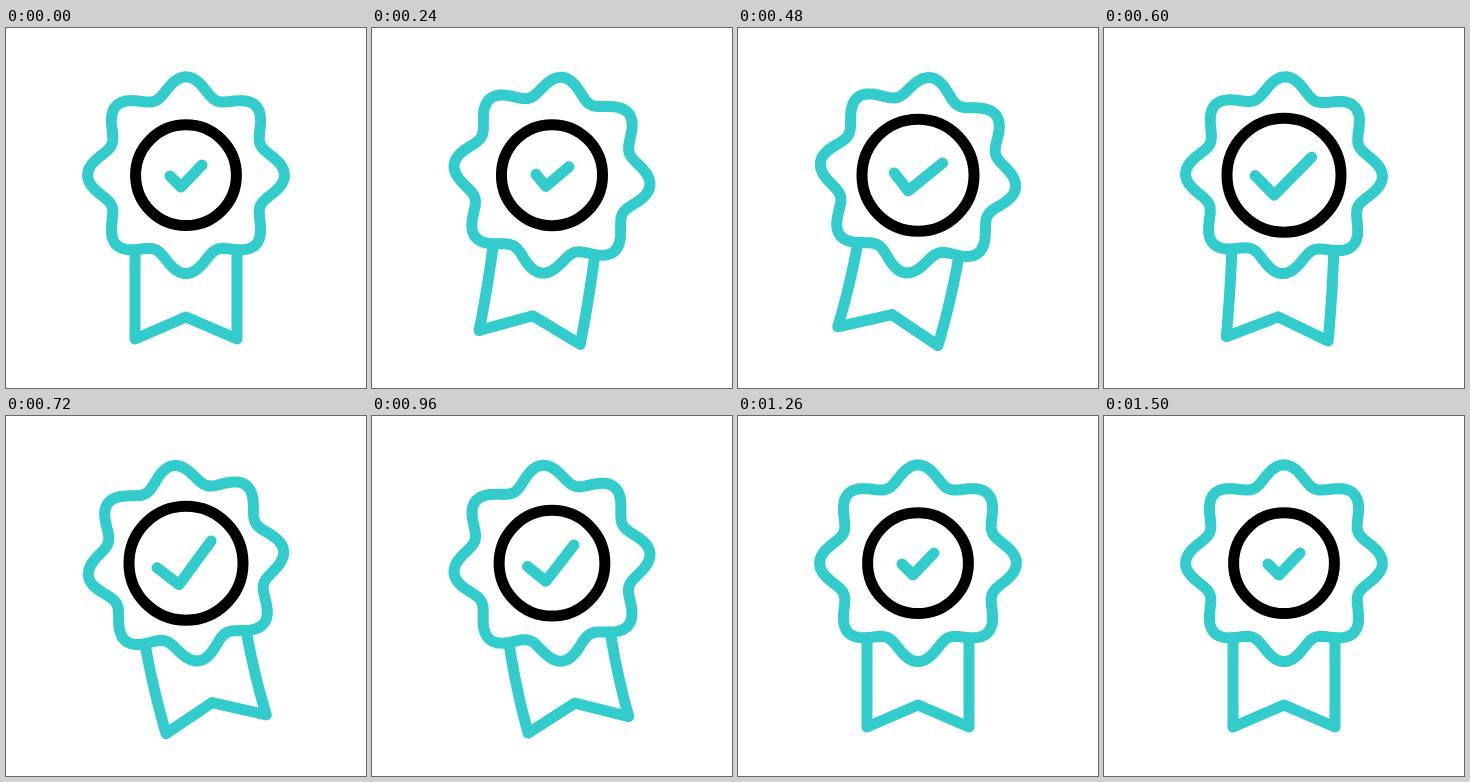
Recreate the animation shown at these times as an HTML page with a canvas. Size 360x360 px, loop 1.53 s.

```html
<!DOCTYPE html>
<html lang="en">
<head>
<meta charset="utf-8">
<title>Award badge</title>
<style>
  html, body { margin: 0; height: 100%; overflow: hidden; background: #fff; }
  canvas { display: block; width: 100vw; height: 100vh; }
</style>
</head>
<body>
<canvas id="stage" width="360" height="360"></canvas>
<script>
const ctx = document.getElementById('stage').getContext('2d');
const LOOP = 1530, CX = 180, CY = 147.2;
const TEAL = '#33cccc';

// Smooth 0..1 progress between two moments
function ease(t, start, end) {
  const u = Math.min(1, Math.max(0, (t - start) / (end - start)));
  return u * u * (3 - 2 * u);
}

const rad = deg => deg * Math.PI / 180;
const mix = (a, b, k) => a + (b - a) * k;

function rotate([x, y], angle) {
  const dx = x - CX, dy = y - CY, c = Math.cos(angle), s = Math.sin(angle);
  return [CX + dx * c - dy * s, CY + dx * s + dy * c];
}

function stroke(points, color, closed) {
  ctx.beginPath();
  points.forEach(p => ctx.lineTo(...p));
  if (closed) ctx.closePath();
  ctx.strokeStyle = color;
  ctx.stroke();
}

function drawRibbon(topAngle, tipAngle) {
  const side = x => Array.from({ length: 13 }, (_, i) => {
    const k = i / 12;
    return rotate([x, mix(222, 311, k)], mix(topAngle, tipAngle, k));
  });
  const notch = rotate([180, 289], tipAngle);
  stroke([...side(129), notch, ...side(231).reverse()], TEAL);
}

function drawStar(angle) {
  const points = Array.from({ length: 360 }, (_, i) => {
    const a = rad(i), r = 89.4 + 9 * Math.cos(8 * a);
    return [CX + r * Math.cos(a + angle), CY + r * Math.sin(a + angle)];
  });
  stroke(points, TEAL, true);
}

function drawRing(grow) {
  ctx.beginPath();
  ctx.arc(CX, CY, mix(50.4, 57, grow), 0, 2 * Math.PI);
  ctx.strokeStyle = '#000';
  ctx.stroke();
}

function drawCheck(grow, angle) {
  const s = mix(1, 1.78, grow);
  const points = [[164, 148], [175, 159], [196, 137]].map(([x, y]) =>
    rotate([181 + (x - 181) * s, 148 + (y - 148) * s], angle));
  stroke(points, TEAL);
}

function draw(t) {
  const swing = rad(7.4) * (ease(t, 80, 300) - 2 * ease(t, 509, 709) + ease(t, 902, 1102));
  const tip = rad(10.6) * (ease(t, 95, 315) - 2 * ease(t, 516, 716) + ease(t, 918, 1113));
  const ringGrow = ease(t, 209, 569) - ease(t, 751, 1111);
  const checkGrow = ease(t, 280, 640) - ease(t, 830, 1160);

  ctx.fillStyle = '#fff';
  ctx.fillRect(0, 0, 360, 360);
  ctx.lineWidth = 11;
  ctx.lineCap = ctx.lineJoin = 'round';
  drawRibbon(swing, tip);
  drawStar(swing);
  drawRing(ringGrow);
  drawCheck(checkGrow, swing);
}

const begin = performance.now();
function tick() {
  draw((performance.now() - begin) % LOOP);
  requestAnimationFrame(tick);
}
tick();
</script>
</body>
</html>
```
